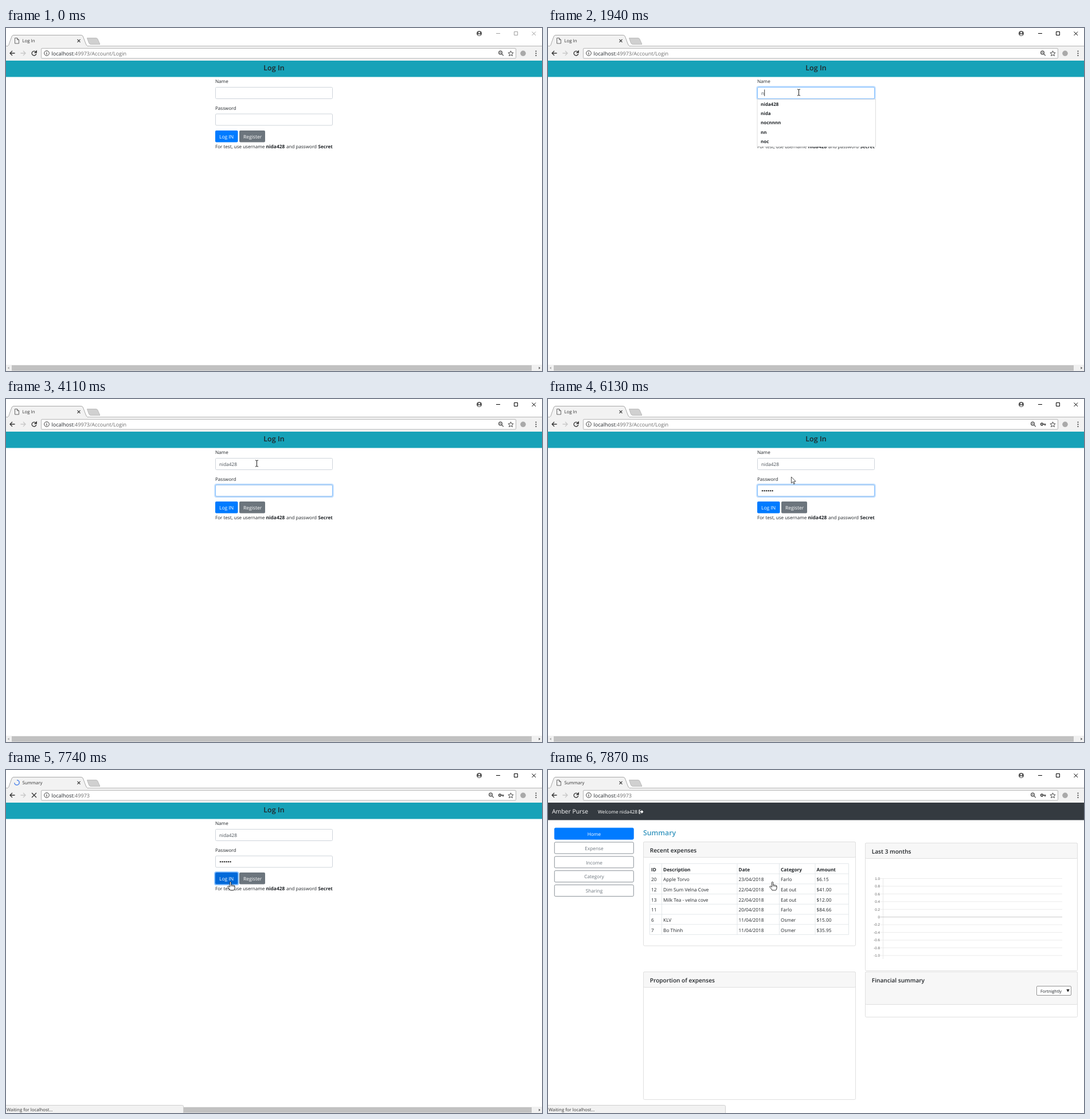
Recreate the animation shown at these times as an HTML page. Size 935 by 599 pixels, loop 8 s.

```html
<!DOCTYPE html>
<html lang="en">
<head>
<meta charset="utf-8">
<title>Log In</title>
<style>
  html, body { margin: 0; width: 100%; height: 100%; overflow: hidden; background: #fff; }
  svg { display: block; width: 100vw; height: 100vh; }
  text { font: 8.1px "Open Sans", "Noto Sans", sans-serif; fill: #212529; text-rendering: geometricPrecision; white-space: pre; }
  .bold { font-weight: 700; }
  .semi { font-weight: 600; }
  .mid { text-anchor: middle; }
  .white { fill: #fff; }
  .btn { font-size: 8.5px; fill: #fff; }
  .ui { font-size: 7.8px; fill: #333; }
  .cell { font-size: 8.25px; }
  .axis { font: 6.3px "Liberation Sans", sans-serif; fill: #666; text-anchor: end; }
  .line { fill: none; stroke: #444; stroke-width: 1.2; }
  .input { fill: #fff; stroke: #ced4da; }
  .ring { fill: none; stroke: #007bff; stroke-opacity: .25; stroke-width: 1.75; }
  .glow { fill: none; stroke: #80bdff; }
  .card { fill: #fff; stroke: #dfdfdf; }
  .head { fill: #f7f7f7; stroke: #dfdfdf; }
  .grid { fill: none; stroke: #dee2e6; stroke-width: .8; }
</style>
</head>
<body>
<svg viewBox="0 0 935 599" preserveAspectRatio="none">
  <rect width="935" height="599" fill="#fff"/>

  <!-- browser window -->
  <g id="browser">
    <rect y="32" width="935" height="25" fill="#f2f2f2"/>
    <path d="M0 31.5H935" stroke="#b4b4b4"/>
    <path d="M2 32C5 31 5 29 6 26L10 15Q11 12.5 13 12.5H131Q133.500 12.500 134.500 15L139 27Q140.500 31.500 143 32" fill="#f2f2f2" stroke="#a8a8a8"/>
    <path d="M3 32H142" stroke="#f2f2f2" stroke-width="1.4"/>
    <path d="M141.500 17.500H157Q159 17.500 160 19.500L164 28.500H148Q145.500 28.500 144.500 26Z" fill="#d0d0d0" stroke="#b0b0b0" stroke-width=".8"/>
    <path id="page" class="line" stroke-width="1" d="M15.500 17.500H19.500L22.500 20.500V27H15.500ZM19.500 17.500V20.500H22.500" style="stroke:#5a5a5a;stroke-width:.9"/>
    <circle id="spinner" cx="19" cy="22" r="4.200" fill="none" stroke-width="1.400" stroke-dasharray="19 7.400"/>
    <text id="title" class="ui" x="28.500" y="25"></text>
    <path class="line" d="M124.500 19.800L129.500 24.800M129.500 19.800L124.500 24.800" style="stroke:#333"/>

    <g fill="none" stroke-width="1.300">
      <path d="M15.500 44H7M11 40L7 44L11 48" stroke="#333"/>
      <path d="M25.500 44H34M30 40L34 44L30 48" stroke="#c8c8c8"/>
      <path id="reload" d="M52 41.700A3.900 3.900 0 1 0 52.800 45M53.300 40V43H50.300Z" stroke="#333"/>
      <path id="stop" d="M45 40L53 48M53 40L45 48" stroke="#333"/>
    </g>
    <rect x="61.500" y="35.500" width="828" height="17.500" rx="1.500" fill="#fff" stroke="#b5b5b5"/>
    <circle class="line" cx="71" cy="44" r="4.300" style="stroke-width:1"/>
    <path class="line" d="M71 43.300V46.500M71 41.400V42.400"/>
    <text x="79.500" y="47.500" style="font-size:9.1px">localhost<tspan id="path" fill="#6b6b6b"></tspan></text>
    <g id="zoom" class="line"><circle r="2.900" cx="-1" cy="-1"/><path d="M1.200 1.200L4.300 4.300M-2.500 -1H.5"/></g>
    <g id="key"><circle class="line" cx="861.500" cy="44" r="1.900" style="stroke-width:1.600"/><path class="line" d="M863.500 44H868.500M867 44V46.500" style="stroke-width:1.600"/></g>
    <path class="line" transform="translate(880.500 44.500)" style="stroke-width:1" d="M0-4.600L1.300-1.500 4.600-1.300 2.100.9 2.900 4.200 0 2.400-2.900 4.200-2.100.9-4.600-1.300-1.300-1.500Z"/>
    <circle cx="902" cy="44.300" r="4.800" fill="#a9a9a9"/>
    <g fill="#444"><circle cx="924.500" cy="40.500" r="1.100"/><circle cx="924.500" cy="44.300" r="1.100"/><circle cx="924.500" cy="48.100" r="1.100"/></g>
    <circle cx="825.500" cy="9.500" r="4.600" fill="#555"/>
    <circle cx="825.500" cy="8" r="1.500" fill="#fff"/>
    <path d="M822.700 12Q825.500 9.300 828.300 12Q825.500 14 822.700 12" fill="#fff"/>
    <path id="controls" fill="none" d="M855 9.500H862M886.500 6.500H892.500V12.500H886.500ZM917.500 6.500L924 13M924 6.500L917.500 13"/>
  </g>

  <!-- login page -->
  <g id="login">
    <rect y="57" width="935" height="28.500" fill="#17a2b8"/>
    <text class="semi mid" x="467.500" y="74" style="font-size:12.5px">Log In</text>
    <text x="365" y="96">Name</text>
    <text x="365" y="143">Password</text>
    <rect class="input" x="365.500" y="103.500" width="204" height="20" rx="2"/>
    <rect class="input" x="365.500" y="150" width="204" height="20" rx="2"/>
    <g id="nameFocus">
      <rect class="ring" x="364.200" y="102.200" width="206.600" height="22.600" rx="3"/>
      <rect class="glow" x="365.500" y="103.500" width="204" height="20" rx="2"/>
    </g>
    <g id="passFocus">
      <rect class="ring" x="364.200" y="148.700" width="206.600" height="22.600" rx="3"/>
      <rect class="glow" x="365.500" y="150" width="204" height="20" rx="2"/>
    </g>
    <text id="name" x="372" y="117" style="font-size:8.25px;fill:#495057"></text>
    <g id="dots" fill="#333"></g>
    <rect id="submit" x="365" y="179" width="39.500" height="20.500" rx="2"/>
    <rect id="submitRing" class="ring" x="364.100" y="178.100" width="41.300" height="22.300" rx="3" style="stroke-opacity:.5"/>
    <text class="btn" x="372" y="193">Log IN</text>
    <rect x="407" y="179" width="45" height="20.500" rx="2" fill="#6c757d"/>
    <text class="btn" x="414" y="193">Register</text>
    <text x="365" y="209.500">For test, use username</text>
    <text class="bold user" x="453.500" y="209.500" style="font-size:8.4px"></text>
    <text x="489" y="209.500">and password</text>
    <text class="bold" x="544.500" y="209.500">Secret</text>
    <g id="list">
      <rect id="listBox" x="365" y="124.500" width="206.500" fill="#fff" stroke="#d5d5d5" stroke-width=".8"/>
    </g>
    <rect id="caret" width=".9" height="11.500" fill="#222"/>
    <g>
      <rect y="588" width="935" height="11" fill="#f1f1f1"/>
      <rect x="10" y="589" width="907" height="9.500" fill="#c1c1c1"/>
      <path d="M5.500 591.500V596L3 593.750Z" fill="#a3a3a3"/>
      <path d="M929.500 591.500V596L932 593.750Z" fill="#505050"/>
    </g>
  </g>

  <g id="dashboard"></g>

  <g id="status">
    <path d="M-1 585.500H307.500Q309.500 585.500 309.500 587.500V600H-1Z" fill="#f2f2f2" stroke="#cfcfcf"/>
    <text class="ui" x="1" y="595.500">Waiting for localhost...</text>
  </g>

  <g id="arrow"><path d="M0 0V11L2.600 8.600L4.300 12.600L6 11.900L4.300 8H7.800Z" fill="#fff" stroke="#000" stroke-width=".7"/></g>
  <g id="beam"><path d="M-2.500-5.500Q0-5.500 0-4.500Q0-5.500 2.500-5.500M0-4.500V4.500M-2.500 5.500Q0 5.500 0 4.500Q0 5.500 2.500 5.500" fill="none" stroke="#000" stroke-width=".9"/></g>
  <g id="hand"><path d="M-1.200 1Q0-.8 1.200 1V6Q2.400 5 3.600 6.300Q5 5.400 6 7Q7.500 6.400 7.600 8V11Q7.400 13 6 15H-.5Q-2 12-4.600 9.500Q-5 7.600-3.200 7.800L-1.200 9.500Z" fill="#fff" stroke="#000" stroke-width=".8"/><path d="M1.200 6V8.500M3.600 6.500V9M6 7.200V9.200" stroke="#000" stroke-width=".7"/></g>
</svg>

<script>
const LOOP = 8000;
const USER = 'nida428';
const USERS = [USER, 'nida', 'nocnnnn', 'nn', 'noc'];
const NAME_KEYS = [1940, 2090, 2240, 2410, 2960, 3100, 3420];
const PASS_KEYS = [4180, 4510, 4740, 5120, 5350, 5580];
const CLICK = 1100, TAB = 3590, SUBMIT = 6830, COMMIT = 7740, PAINT = 7780, DONE = 7870;
const NAME_CARET = [[CLICK, 1640], [1940, 2900], [2960, TAB]];
const PASS_CARET = [[TAB, 4110], [4180, 6130], [6680, SUBMIT]];
const FRAME = 78.4;

const $ = id => document.getElementById(id);
const set = (id, attrs) => { for (const k in attrs) $(id).setAttribute(k, attrs[k]); };
const show = (id, on) => { $(id).style.display = on ? '' : 'none'; };
const write = (id, s) => { if ($(id).textContent !== s) $(id).textContent = s; };
const clamp = v => Math.max(0, Math.min(1, v));
const ramp = (t, start) => clamp((t - start) / 150);
const count = (keys, t) => keys.filter(k => k <= t).length;
const within = (spans, t) => spans.some(([a, b]) => t >= a && t < b);

const text = (x, y, s, cls = '', size = '') =>
  `<text x="${x}" y="${y}" class="${cls}"${size && ` style="font-size:${size}px"`}>${s}</text>`;
const rect = (x, y, w, h, attrs) => `<rect x="${x}" y="${y}" width="${w}" height="${h}" ${attrs}/>`;

function card(x, y, w, h, headHeight, title) {
  return rect(x, y, w, h, 'class="card" rx="2"') + rect(x, y, w, headHeight, 'class="head" rx="2"') +
    text(x + 11.3, y + 18, title, 'semi', 10.1);
}

function table() {
  const rows = [
    ['ID', 'Description', 'Date', 'Category', 'Amount'],
    ['20', 'Apple Torvo', '23/04/2018', 'Farlo', '$6.15'],
    ['12', 'Dim Sum Velna Cove', '22/04/2018', 'Eat out', '$41.00'],
    ['13', 'Milk Tea - velna cove', '22/04/2018', 'Eat out', '$12.00'],
    ['11', '', '20/04/2018', 'Farlo', '$84.66'],
    ['6', 'KLV', '11/04/2018', 'Osmer', '$15.00'],
    ['7', 'Bo Thinh', '11/04/2018', 'Osmer', '$35.95']
  ];
  const cols = [177.5, 198.5, 330, 403.5, 466, 524.5], top = 163.5, pitch = 17.7;
  const lines = cols.map(x => `M${x} ${top}V${top + 7 * pitch}`).join('') +
    [...Array(8).keys()].map(i => `M177.5 ${top + i * pitch}H524.5`).join('');
  return `<path class="grid" d="${lines}"/>` + rows.map((row, r) => row.map((s, c) =>
    text(cols[c] + 2.6, top + 13 + r * pitch, s, r ? 'cell' : 'cell bold')).join('')).join('');
}

function chart() {
  let out = '<path d="M584.5 189.5V330" stroke="#e3e3e3" stroke-width=".8"/>';
  for (let i = 0; i <= 10; i++) {
    const y = 189.5 + i * 13.45, v = (10 - 2 * i) / 10;
    out += `<path d="M580 ${y}H897" stroke="${i === 5 ? '#bbb' : '#e6e6e6'}" stroke-width=".8"/>` +
      text(579, y + 2.2, v ? v.toFixed(1) : '0', 'axis');
  }
  return out;
}

function sidebar() {
  return ['Home', 'Expense', 'Income', 'Category', 'Sharing'].map((s, i) => {
    const y = 101.2 + i * 24.85;
    const look = i ? 'fill="#fff" stroke="#6c757d" stroke-width=".8"' : 'fill="#007bff" stroke="#007bff" stroke-width=".8"';
    return rect(11.3, y, 138, 20, `rx="2" ${look}`) +
      `<text class="mid" x="80.5" y="${y + 13.6}" style="font-size:8.3px;fill:${i ? '#6c757d' : '#fff'}">${s}</text>`;
  }).join('');
}

$('dashboard').innerHTML =
  rect(0, 57, 935, 542, 'fill="#fff"') + rect(0, 57, 935, 30.5, 'fill="#343a40"') +
  text(7, 76.3, 'Amber Purse', 'white', 10.4) + text(87, 76, 'Welcome ' + USER, 'white', 8.3) +
  '<path d="M161.5 70H159V76H161.5" fill="none" stroke="#fff" stroke-width="1.2"/>' +
  '<path d="M160.500 72H163V69.800L166.500 73L163 76.200V74H160.500Z" fill="#fff"/>' +
  sidebar() +
  '<text class="semi" x="166" y="113.500" style="font-size:12.3px;fill:#3394bd">Summary</text>' +
  card(166.5, 125.5, 370, 181.5, 27, 'Recent expenses') + table() +
  card(553.5, 127.5, 370, 223, 27, 'Last 3 months') + chart() +
  card(166.5, 352.5, 370, 223, 27, 'Proportion of expenses') +
  card(553.5, 352.5, 370, 79, 57, 'Financial summary') +
  rect(852.5, 377.5, 60, 16, 'rx="1.5" fill="#fff" stroke="#8a8a8a" stroke-width=".9"') +
  text(859, 388.5, 'Fortnightly', '', 7.4) +
  '<path d="M904.300 383H909.700L907 388Z" fill="#222"/>';

document.querySelector('.user').textContent = USER;
$('dots').innerHTML = PASS_KEYS.map((_, i) => `<circle cx="${374 + i * 3.5}" cy="160.3" r="1.2"/>`).join('');
$('list').innerHTML += USERS.map((_, i) => text(371, 135.5 + i * 16.4, '', 'bold', 8)).join('');
const rows = [...$('list').querySelectorAll('text')];
const dots = [...$('dots').children];

// Pointer legs: start time, number of steps, end points, easing power.
const LEGS = [
  { at: 140, steps: 6, lead: 0, from: [793, 499], to: [443, 106.5], pow: 2 },
  { at: 760, steps: 4, lead: 1, from: [443, 106.5], to: [437.5, 112.5], pow: 1 },
  { at: 6130, steps: 5, lead: 1, from: [437.5, 112.5], to: [391.5, 195], pow: 1.5 }
];

function pointer(t) {
  const leg = LEGS.filter(l => l.at <= t).pop();
  if (!leg) return null;
  const p = clamp((Math.floor((t - leg.at) / FRAME) + leg.lead) / leg.steps);
  const e = 1 - (1 - p) ** leg.pow;
  return leg.from.map((v, i) => v + (leg.to[i] - v) * e);
}

function shape(x, y, t) {
  if (t >= SUBMIT) return 'hand';
  if (x > 365 && x < 404 && y > 179 && y < 200) return 'hand';
  return x > 365 && x < 570 && (y > 103 && y < 124 || y > 150 && y < 170) ? 'beam' : 'arrow';
}

function drawBrowser(t) {
  const loading = t >= SUBMIT && t < DONE, committed = t >= COMMIT, key = t >= PASS_KEYS[0];
  write('title', committed ? 'Summary' : 'Log In');
  write('path', committed ? ':49973' : ':49973/Account/Login');
  show('page', !loading);
  show('spinner', loading);
  show('reload', !loading);
  show('stop', loading);
  const angle = committed ? -90 + (t - COMMIT) * .4 : -(t - SUBMIT) * .25;
  set('spinner', { transform: `rotate(${angle} 19 22)`, stroke: committed ? '#4a80e8' : '#999' });
  show('key', key);
  set('zoom', { transform: `translate(${key ? 846.5 : 863.5} 44)` });
  set('controls', { stroke: t >= CLICK - 30 ? '#000' : '#a0a0a0' });
  show('status', t >= 6990);
}

function drawLogin(t) {
  const typed = USER.slice(0, count(NAME_KEYS, t)), hidden = count(PASS_KEYS, t);
  write('name', typed);
  dots.forEach((d, i) => { d.style.display = i < hidden ? '' : 'none'; });
  set('nameFocus', { opacity: ramp(t, CLICK) - ramp(t, TAB) });
  set('passFocus', { opacity: ramp(t, TAB) - ramp(t, SUBMIT) });

  const open = typed && t < TAB;
  show('list', open);
  if (open) {
    const hits = USERS.filter(u => u.startsWith(typed));
    rows.forEach((r, i) => { r.textContent = hits[i] || ''; });
    set('listBox', { height: hits.length * 16.4 + .6 });
  }

  const inName = within(NAME_CARET, t), inPass = within(PASS_CARET, t);
  show('caret', inName || inPass);
  if (inName) set('caret', { x: 372.2 + (typed ? $('name').getComputedTextLength() : 0), y: 107.5 });
  if (inPass) set('caret', { x: 372.3 + hidden * 3.5, y: 154.3 });

  const hover = ramp(t, 6400);
  set('submit', { fill: `rgb(0,${123 - 18 * hover},${255 - 38 * hover})` });
  set('submitRing', { opacity: ramp(t, SUBMIT) });
}

function drawPointer(t) {
  const at = pointer(t), kind = at && shape(...at, t);
  for (const id of ['arrow', 'beam', 'hand']) show(id, id === kind);
  if (at) set(kind, { transform: `translate(${at[0]} ${at[1]})` });
}

function frame(now) {
  const t = now % LOOP;
  drawBrowser(t);
  drawLogin(t);
  show('login', t < PAINT);
  show('dashboard', t >= PAINT);
  drawPointer(t);
  requestAnimationFrame(() => frame(performance.now()));
}
frame(performance.now());
</script>
</body>
</html>
```
